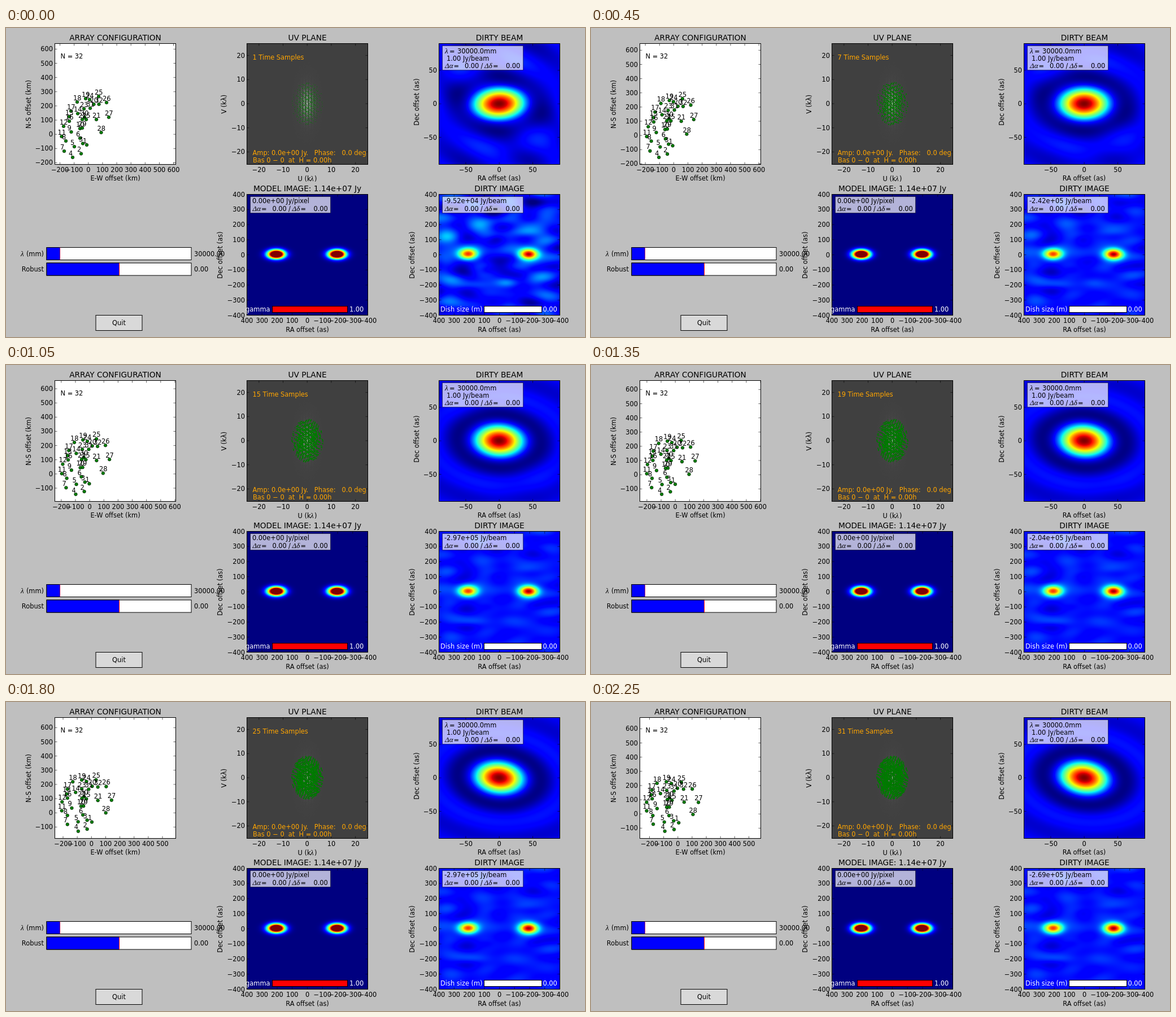
These frames come from a looping animation (1025x547 px, 2.4 s). An HTML page with a canvas:

```html
<!DOCTYPE html>
<html lang="en">
<head>
<meta charset="utf-8">
<title>Interferometer simulator</title>
<style>
html, body { margin: 0; width: 100%; height: 100%; overflow: hidden; background: #bfbfbf; }
canvas { display: block; }
</style>
</head>
<body>
<canvas id="stage" width="1025" height="547"></canvas>
<script>
const ctx = document.getElementById('stage').getContext('2d');
const SIZE = 214, STEPS = 16, STEP_MS = 150;
const SANS = '"DejaVu Sans", sans-serif';
const MATH = 'italic 13px "Liberation Serif", serif';
const LABEL = '11.4px ' + SANS, TITLE = '13.7px ' + SANS;

// Antenna pixel positions at the first step: x, y pairs
const antennas = [
  143,207, 133,222.5, 136,204.5, 118,229, 121,210, 131,195, 103,218, 106,200,
  115.5,184, 131,178, 98.5,192, 102,174, 112,157, 127,151.5, 142,162, 112,165,
  115,147, 126,131, 141,125, 155.5,135, 160,162, 135,162, 138,143, 148,127,
  164,121, 178,132, 182,158, 168.5,185, 135,177, 139,158, 149,142, 164.5,135];
const imageValues = [9.52, 14.8, 20.1, 24.2, 27.4, 29.8, 30.1, 29.7, 24.9, 20.4,
  23.6, 27.1, 29.7, 29.2, 28.1, 26.9];

let seed = 11;
const random = () => (seed = (seed * 16807) % 2147483647) / 2147483647;
const waves = Array.from({ length: 26 }, () => {
  const angle = random() * Math.PI, radius = Math.sqrt(random());
  return { kx: .12 * radius * Math.cos(angle), ky: .25 * radius * Math.sin(angle), phase: random() * 6.28, drift: random() - .5 };
});
// Sky patches around the image centre: x, y, width, height, lasting and early strength
const patches = [
  [50, -40, 34, 8, .05, .03], [-48, 53, 32, 7, .05, .02], [-40, -52, 26, 12, .02, .09],
  [14, 50, 20, 8, .01, .13], [-88, -30, 22, 10, .01, .08], [78, -66, 24, 10, 0, .09],
  [-80, 44, 24, 9, .01, .08], [-4, -28, 14, 7, -.03, -.03], [-22, 27, 13, 7, -.03, -.03],
  [62, 25, 16, 7, -.03, -.02], [80, 50, 18, 9, -.02, -.04]];

const clamp = v => Math.max(0, Math.min(1, v));
const ramp = (v, a, b) => clamp((v - a) / (b - a));
const gauss = (x, y, a, b) => Math.exp(-((x / a) ** 2) - (y / b) ** 2);

function jet(v) {
  v = clamp(v);
  return [
    255 * (ramp(v, .35, .66) - .5 * ramp(v, .89, 1)),
    255 * (ramp(v, .125, .375) - ramp(v, .64, .91)),
    255 * (.5 + .5 * ramp(v, 0, .11) - ramp(v, .34, .65))];
}

// 2 J1(z) / z
function airy(z) {
  let sum = 0;
  for (let i = 0; i < 7; i++) {
    const a = (i + .5) * Math.PI / 14;
    sum += Math.cos(z * Math.cos(a)) * Math.sin(a) ** 2;
  }
  return sum * 2 / 7;
}

function text(s, x, y, color = '#000', align = 'left', font = LABEL) {
  ctx.font = font;
  ctx.textAlign = align;
  ctx.fillStyle = color;
  ctx.fillText(s, x, y);
}

function rotatedText(s, x, y) {
  ctx.save();
  ctx.translate(x, y);
  ctx.rotate(-Math.PI / 2);
  text(s, 0, 4, '#000', 'center');
  ctx.restore();
}

function box(x, y, w, h, fill, stroke = '#000') {
  ctx.fillStyle = fill;
  ctx.fillRect(x, y, w, h);
  ctx.strokeStyle = stroke;
  ctx.lineWidth = 1;
  ctx.strokeRect(x, y, w, h);
}

const buffer = document.createElement('canvas');
buffer.width = buffer.height = SIZE;
const bufferCtx = buffer.getContext('2d');

// Fills a panel; shade takes offsets from its centre and returns [r, g, b]
function field(left, top, shade) {
  const img = bufferCtx.createImageData(SIZE, SIZE), middle = (SIZE - 1) / 2;
  for (let i = 0; i < SIZE * SIZE; i++) {
    const c = shade(i % SIZE - middle, Math.floor(i / SIZE) - middle);
    img.data.set([c[0], c[1], c[2], 255], i * 4);
  }
  bufferCtx.putImageData(img, 0, 0);
  ctx.drawImage(buffer, left, top);
}

const minus = n => String(n).replace('-', '\u2212');

// Frame, inward ticks and labels; tick entries are [value, pixel]
function axes(left, top, title, xTicks, yTicks) {
  const right = left + SIZE, bottom = top + SIZE;
  ctx.strokeStyle = '#000';
  ctx.lineWidth = 1;
  ctx.strokeRect(left, top, SIZE, SIZE);
  ctx.lineWidth = .6;
  ctx.beginPath();
  for (const [value, x] of xTicks) {
    ctx.moveTo(x, top); ctx.lineTo(x, top + 4);
    ctx.moveTo(x, bottom); ctx.lineTo(x, bottom - 4);
    text(minus(value), x, bottom + 13.5, '#000', 'center');
  }
  for (const [value, y] of yTicks) {
    ctx.moveTo(left, y); ctx.lineTo(left + 4, y);
    ctx.moveTo(right, y); ctx.lineTo(right - 4, y);
    text(minus(value), left - 3.5, y + 4, '#000', 'right');
  }
  ctx.stroke();
  text(title, left + SIZE / 2, top - 5.2, '#000', 'center', TITLE);
}

const ticks = (from, to, step, place) => {
  const list = [];
  for (let v = from; v <= to; v += step) list.push([v, place(v)]);
  return list;
};

function offsetLine(x, y) {
  text('Δα', x, y, '#000', 'left', MATH);
  text('=', x + 15.5, y);
  text('0.00', x + 35, y);
  text('/', x + 63.5, y);
  text('Δδ', x + 70, y, '#000', 'left', MATH);
  text('=', x + 85, y);
  text('0.00', x + 108, y);
}

const originX = k => 145.8 + .15 * k + .0256 * k * k;
const originY = k => 188.2 + k * 2 / 3;

function antennaAt(i, k) {
  const x = antennas[2 * i], y = antennas[2 * i + 1], s = k / 15;
  const dx = x - 168.5, dy = y - 185;
  return [
    x + s * (4 + .194 * dx + .238 * dy) + originX(k) - originX(0) - .14 * (x - 146) * s * (1 - s),
    y + s * (14 + .179 * dx - .12 * dy)];
}

const positions = k => Array.from({ length: 32 }, (_, i) => antennaAt(i, k));

function drawArray(k) {
  const x0 = originX(k), y0 = originY(k), scale = .2514;
  ctx.fillStyle = '#fff';
  ctx.fillRect(86.5, 27.5, SIZE, SIZE);
  axes(86.5, 27.5, 'ARRAY CONFIGURATION',
    ticks(-200, 600, 100, v => x0 + v * scale).filter(t => t[1] <= 300.2),
    ticks(-200, 600, 100, v => y0 - v * scale).filter(t => t[1] <= 241));
  text('E-W offset (km)', 193.5, 270, '#000', 'center');
  rotatedText('N-S offset (km)', 40, 135);
  text('N = 32', 96.5, 53.5);
  const dots = positions(k);
  for (const [x, y] of dots) {
    ctx.beginPath();
    ctx.arc(x, y, 2.8, 0, 7);
    ctx.fillStyle = '#008000';
    ctx.fill();
    ctx.strokeStyle = '#000';
    ctx.lineWidth = .6;
    ctx.stroke();
  }
  dots.forEach(([x, y], i) => text(i + 1, x - 7, y - 3.3));
}

function drawUV(k) {
  field(426, 27, (x, y) => {
    const hash = Math.abs(Math.sin(x * 12.99 + y * 78.23) * 43758.5) % 1;
    const fringe = Math.cos(x * Math.PI / 5) ** 2;
    const v = 64 + (140 * fringe * gauss(x, y, 10, 22) + 8 * gauss(x, y, 18, 45)) * (.4 + .6 * hash);
    return [v, v, v];
  });
  ctx.fillStyle = 'rgba(0,128,0,.65)';
  for (let sample = 0; sample <= 2 * k; sample++) {
    const dots = positions(sample / 2);
    for (const a of dots) for (const b of dots) {
      const v = (a[1] - b[1]) * .42, u = (a[0] - b[0]) * .38 + .25 * v;
      if (a !== b && (u / 28) ** 2 + (v / 38.5) ** 2 < 1) ctx.fillRect(533 + u, 133.5 + v, 1, 1);
    }
  }
  axes(426.5, 27.5, 'UV PLANE',
    ticks(-20, 20, 10, v => 533.2 + v * 4.27), ticks(-20, 20, 10, v => 134 - v * 4.27));
  text('U (k', 516.5, 271);
  text('λ', 539, 271, '#000', 'left', MATH);
  text(')', 546, 271);
  rotatedText('V (kλ)', 386, 135);
  text(`${2 * k + 1} Time Samples`, 436.5, 56, '#ffa500');
  text('Amp: 0.0e+00 Jy.   Phase:   0.0 deg', 436.5, 224.5, '#ffa500');
  text('Bas 0 \u2212 0  at  H = 0.00h', 437, 237.5, '#ffa500');
}

function drawBeam(k) {
  const early = Math.exp(-k / 3.5);
  const tilt = .15 * (k / 15) ** 1.5 - .06 * early, c = Math.cos(tilt), s = Math.sin(tilt);
  const width = 14.4 + 1.2 * early, ring = .75 - .25 * early;
  field(766, 27, (x, y) => {
    const z = Math.hypot((x * c + y * s) / width, (y * c - x * s) / 9.3);
    const lobe = airy(z) * (z < 3.83 ? 1 : ring);
    const ripple = .045 * early * Math.cos(.055 * x - .06 * y) * (1 - Math.exp(-z * z / 20));
    return jet((lobe + ripple + .105) / 1.105);
  });
  axes(766.5, 27.5, 'DIRTY BEAM',
    ticks(-50, 50, 50, v => 873.2 + v * 1.186), ticks(-50, 50, 50, v => 134.2 - v * 1.186));
  text('RA offset (as)', 873, 270, '#000', 'center');
  rotatedText('Dec offset (as)', 727, 131);
  box(772.5, 31.5, 143, 43, 'rgba(255,255,255,.7)', 'rgba(0,0,0,.5)');
  text('λ', 777, 44.5, '#000', 'left', MATH);
  text('=', 785, 44.5);
  text('30000.0mm', 799, 44.5);
  text('1.00 Jy/beam', 780, 57.5);
  offsetLine(777, 70.5);
}

function imageAxes(left, title, value, boxWidth) {
  const scale = SIZE / 800, top = 294.5;
  axes(left, top, title,
    ticks(-400, 400, 100, v => left + SIZE / 2 - v * scale),
    ticks(-400, 400, 100, v => top + SIZE / 2 - v * scale));
  text('RA offset (as)', left + SIZE / 2, 537.5, '#000', 'center');
  rotatedText('Dec offset (as)', left - 47.5, 402);
  box(left + 6, 298.5, boxWidth, 29, 'rgba(255,255,255,.7)', 'rgba(0,0,0,.5)');
  text(value, left + 9.5, 309.5);
  offsetLine(left + 10, 324);
}

function drawModel() {
  field(426, 294, (x, y) =>
    jet(1.6 * (gauss(x + 54.5, y + .5, 14.5, 7.6) + gauss(x - 53, y + .5, 14.5, 7.6))));
  imageAxes(426.5, 'MODEL IMAGE: 1.14e+07 Jy', '0.00e+00 Jy/pixel', 142);
  text('gamma', 467.5, 501.5, '#fff', 'right');
  box(471.5, 492.5, 133, 11, '#f00');
  text('1.00', 608, 501.5, '#fff');
}

function drawImage(k) {
  const early = Math.exp(-k / 2.2), noise = .006 + .007 * early;
  field(766, 294, (x, y) => {
    let v = .135 + .74 * gauss(x + 55, y + .5, 16.5, 9.6) + .83 * gauss(x - 52, y + .5, 16.5, 9.6);
    for (const w of waves) v += noise * Math.cos(w.kx * x + w.ky * y + w.phase + 3 * early * w.drift);
    for (const [px, py, a, b, lasting, extra] of patches) {
      v += (lasting + extra * early) * gauss(x - px, y - py, a, b);
    }
    return jet(v);
  });
  const value = imageValues[k];
  const shown = value < 10 ? value.toFixed(2) + 'e+04' : (value / 10).toFixed(2) + 'e+05';
  imageAxes(766.5, 'DIRTY IMAGE', `-${shown} Jy/beam`, 143);
  text('Dish size (m)', 843.5, 501.5, '#fff', 'right');
  box(846.5, 492.5, 102, 11, '#fff');
  text('0.00', 950.5, 501.5, '#fff');
}

function slider(y, fillWidth, value, mark) {
  box(72, y, 256, 22, '#fff');
  box(72, y, fillWidth, 22, '#00f');
  ctx.fillStyle = mark;
  ctx.fillRect(72 + fillWidth - .5, y, 1, 22);
  text(value, 333, y + 15);
}

function drawControls() {
  slider(388.5, 23.5, '30000.00', '#a0006a');
  slider(416, 128.5, '0.00', '#f00');
  text('λ', 26, 403.5, '#000', 'left', MATH);
  text('(mm)', 67, 403.5, '#000', 'right');
  text('Robust', 67, 431, '#000', 'right');
  box(159, 508.5, 82, 27, '#d9d9d9');
  text('Quit', 200, 526, '#000', 'center');
}

function draw(k) {
  ctx.fillStyle = '#bfbfbf';
  ctx.fillRect(0, 0, 1025, 547);
  drawArray(k);
  drawUV(k);
  drawBeam(k);
  drawControls();
  drawModel();
  drawImage(k);
}

let shownStep = -1;
const start = performance.now();
function tick() {
  const step = Math.floor((performance.now() - start) / STEP_MS) % STEPS;
  if (step !== shownStep) draw(shownStep = step);
  requestAnimationFrame(tick);
}
tick();
</script>
</body>
</html>
```
